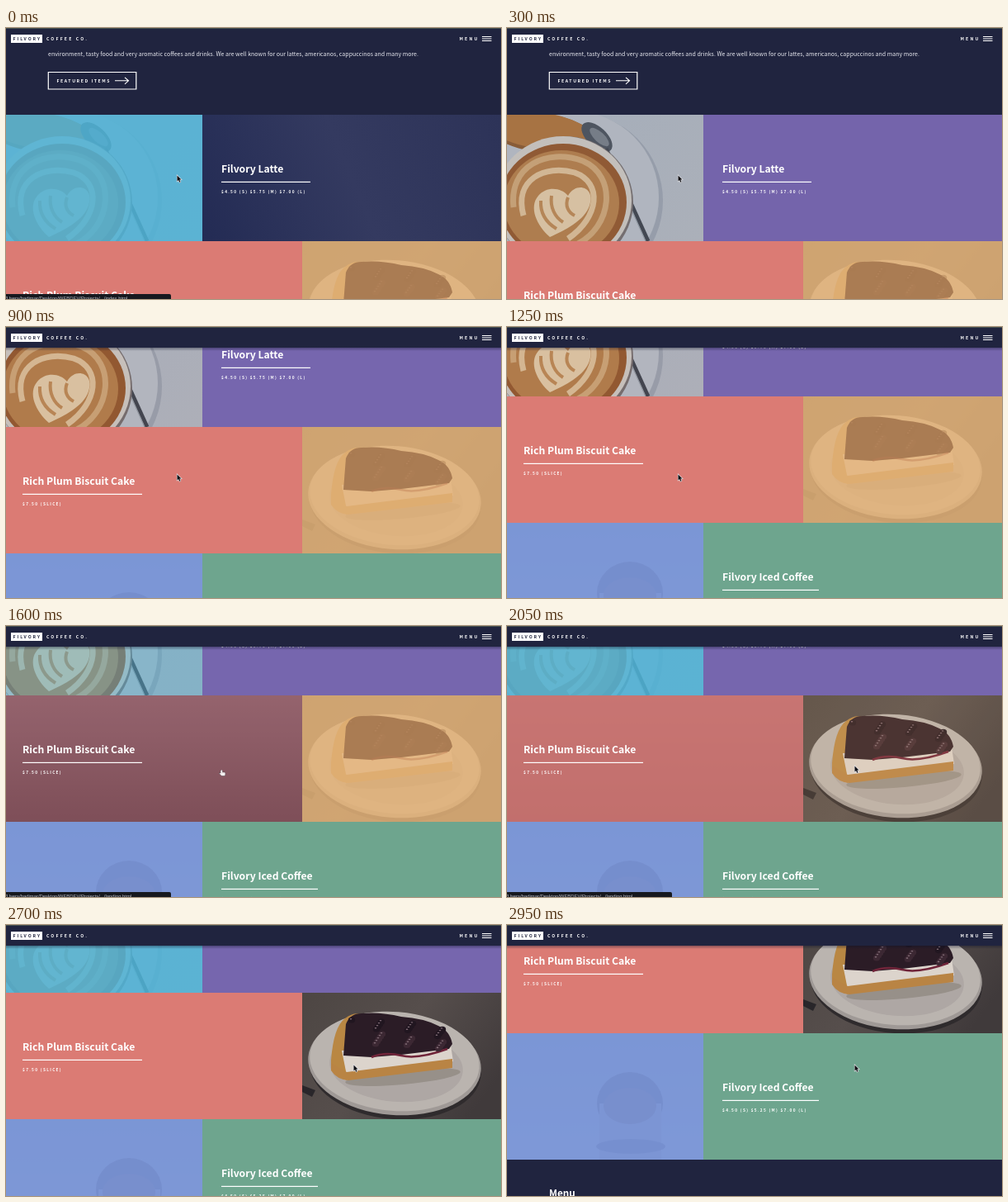
Write an HTML page with a canvas that moves like this. It is 600 by 328 pixels and loops after 3 s.

```html
<!DOCTYPE html>
<html lang="en">
<head>
<meta charset="utf-8">
<title>Coffee shop page</title>
<style>
html, body { margin: 0; width: 100%; height: 100%; overflow: hidden; background: #20243f; }
canvas { display: block; width: 600px; height: 328px; }
</style>
</head>
<body>
<canvas id="stage" width="600" height="328"></canvas>
<script>
const ctx = document.getElementById('stage').getContext('2d');
const SANS = '"Noto Sans CJK JP", "Noto Sans CJK SC", "Noto Sans", sans-serif';
const NAVY = '#20243f';
const ROW = 153;
const LOOP = 3000;

const clamp = v => Math.max(0, Math.min(1, v));
const span = (t, start, length) => clamp((t - start) / length);
const smooth = u => u * u * (3 - 2 * u);
const easeOut = u => 1 - (1 - u) ** 3;
const easeInOut = u => u < .5 ? 4 * u ** 3 : 1 - (2 - 2 * u) ** 3 / 2;

// The CSS "ease" curve, solved by bisection
function ease(u) {
  const bez = (a, b, s) => 3 * a * s * (1 - s) ** 2 + 3 * b * s * s * (1 - s) + s ** 3;
  let lo = 0, hi = 1;
  for (let i = 0; i < 20; i++) {
    const mid = (lo + hi) / 2;
    if (bez(.25, .25, mid) < u) lo = mid; else hi = mid;
  }
  return bez(.1, 1, lo);
}

function text(str, x, y, size, { weight = 700, gap = 0, color = '#fff', family = SANS } = {}) {
  ctx.font = `${weight} ${size}px ${family}`;
  ctx.letterSpacing = gap + 'px';
  ctx.fillStyle = color;
  ctx.fillText(str, x, y);
}

function rect(x, y, w, h, color) {
  ctx.fillStyle = color;
  ctx.fillRect(x, y, w, h);
}

function oval(x, y, rx, ry, color, turn = 0) {
  ctx.fillStyle = color;
  ctx.beginPath();
  ctx.ellipse(x, y, rx, ry, turn, 0, 2 * Math.PI);
  ctx.fill();
}

function shape(path, color) {
  ctx.fillStyle = color;
  ctx.fill(new Path2D(path));
}

function stroke(path, width, color = '#fff') {
  ctx.strokeStyle = color;
  ctx.lineWidth = width;
  ctx.stroke(new Path2D(path));
}

function gradient(x0, y0, x1, y1, ...colors) {
  const g = ctx.createLinearGradient(x0, y0, x1, y1);
  colors.forEach((c, i) => g.addColorStop(i / (colors.length - 1), c));
  return g;
}

function drawLatte() {
  rect(0, 0, 238, ROW, gradient(90, 0, 238, ROW, '#a8adb9', '#adafb8'));
  oval(84, 104, 105, 106, '#989ca8');
  oval(81, 100, 103, 104, '#b2b5be');
  oval(42, 22, 66, 24, '#8a5a34', .14);
  oval(40, 19, 64, 22, '#a9713f', .14);
  oval(109, 27, 23, 12, '#4f535d', .75);
  oval(112, 27, 15, 6, '#777b85', .75);
  stroke('M120 41 L171 153', 5, '#43454f');
  stroke('M118 41 L168 153', 1.3, '#9297a0');
  oval(70, 106, 83, 80, '#756c6d');
  oval(68, 104, 83, 78, '#c6bfba');
  oval(68, 106, 77, 71, '#925831');
  oval(66, 107, 70, 64, '#b07b4b');
  stroke('M8 112 C2 62 48 40 92 56 C134 74 128 136 84 157', 7, '#c79f74');
  stroke('M20 122 C8 78 46 60 82 70 C116 82 112 124 74 150', 7, '#d4b692');
  shape('M74 98 C84 80 108 88 100 110 C94 128 70 140 52 148 C36 134 26 112 38 98 C48 86 66 88 74 98Z', '#d9c0a0');
  stroke('M41 104 C40 122 50 132 60 138 M54 98 C52 112 58 124 68 130 M74 100 C70 110 74 118 82 122', 4, '#b88555');
}

const TOPPING = 'M53 38 Q58 25 72 25 Q96 23 120 29 Q148 31 165 40 Q179 46 182 62 L178 68 L120 75 L84 78 L50 76Z';

function drawCake() {
  rect(0, 0, 241, ROW, gradient(0, 0, 200, ROW, '#4d4643', '#564e4c', '#403a3b'));
  shape('M0 112 L16 118 L12 126 L0 120Z', '#29262a');
  oval(113, 92, 104, 61, '#2f2b2d', .08);
  oval(112, 86, 105, 62, '#9f9996', .08);
  oval(112, 83, 103, 60, '#bab4af', .08);
  oval(114, 89, 81, 43, '#aea7a4', .08);
  oval(122, 102, 70, 9, '#979089', -.09);
  shape('M35 82 Q38 41 52 31 Q62 23 72 26 L55 58 L52 80 L54 106 Q40 100 35 90Z', '#b98743');
  shape('M48 70 L180 63 L183 83 L54 100Z', '#dcd4cc');
  shape('M35 85 L54 96 L182 80 L182 91 L56 106 Q42 105 35 94Z', '#b98444');
  shape(TOPPING, '#2b1c26');
  stroke('M84 78 Q100 71 120 76 T176 68', 2.5, '#702439');
  for (let i = 0; i < 26; i++) {
    const x = 60 + i * 37 % 112;
    const y = 33 + i * 17 % 33 + Math.max(0, x - 110) * .14;
    oval(x, y, 4.2, 3.6, i % 2 ? '#3c2833' : '#211620');
    oval(x - 1, y - 1.3, 1.3, .8, '#87717b');
  }
}

function drawGlass() {
  rect(0, 0, 238, ROW, gradient(0, 0, 0, ROW, '#9da0ad', '#b3b4bd'));
  oval(149, 85, 40, 38, '#70636b');
  rect(112, 85, 75, 68, '#a29aa5');
  oval(149, 88, 32, 22, '#806a6a');
  oval(150, 137, 42, 9, '#77707a');
}

const PRODUCTS = [
  { y: 105, split: 238, textX: 261, rule: 108, title: 'Filvory Latte', price: '$4.50 (S) $5.75 (M) $7.00 (L)',
    panel: '#7666ae', tint: '#4eb4d8', alpha: .86, photo: drawLatte, photoLeft: true },
  { y: 258, split: 359, textX: 20, rule: 145, title: 'Rich Plum Biscuit Cake', price: '$7.50 (SLICE)',
    panel: '#db7b74', tint: '#e6b47a', alpha: .85, photo: drawCake, photoLeft: false },
  { y: 411, split: 238, textX: 261, rule: 117, title: 'Filvory Iced Coffee', price: '$4.50 (S) $5.25 (M) $7.00 (L)',
    panel: '#6ea58e', tint: '#7795dc', alpha: .87, photo: drawGlass, photoLeft: true }
];

// dark: how far the panel has turned navy; clear: how far the photo is revealed
function drawProduct(p, dark, clear) {
  const photoX = p.photoLeft ? 0 : p.split;
  const photoW = p.photoLeft ? p.split : 600 - p.split;
  const panelX = p.photoLeft ? p.split : 0;
  const panelW = 600 - photoW;

  ctx.save();
  ctx.translate(photoX, p.y);
  ctx.beginPath();
  ctx.rect(0, 0, photoW, ROW);
  ctx.clip();
  p.photo();
  ctx.globalAlpha = p.alpha * (1 - clear);
  rect(0, 0, photoW, ROW, p.tint);
  if (p.photo === drawCake) {
    ctx.globalAlpha = .34 * (1 - clear);
    shape(TOPPING, '#6e3c20');
  }
  ctx.restore();

  rect(panelX, p.y, panelW, ROW, p.photoLeft
    ? gradient(panelX, p.y + ROW, panelX + panelW, p.y, '#232b54', '#343a60', '#2d3358')
    : gradient(0, p.y, 0, p.y + ROW, '#4c4b68', '#1d203c'));
  ctx.globalAlpha = 1 - dark;
  rect(panelX, p.y, panelW, ROW, p.panel);
  ctx.globalAlpha = 1;

  text(p.title, p.textX, p.y + 70.4, 12.2);
  rect(p.textX, p.y + 80.8, p.rule, 1.2, '#fff');
  text(p.price, p.textX, p.y + 94.9, 4.8, { gap: 1.3 });
}

function drawIntro() {
  text('environment, tasty food and very aromatic coffees and drinks. We are well known for our lattes, americanos, cappuccinos and many more.',
    51, 34, 7.02, { weight: 400, color: '#e6e7ee' });
  stroke('M51.3 53.5 H157.8 V74 H51.3Z', 1.2);
  text('FEATURED ITEMS', 61.5, 65.8, 5.2, { gap: 1.57 });
  stroke('M132 63.8 H148.5 M144 59.8 L148.5 63.8 L144 67.8', 1.1);
}

function drawHeader(scroll) {
  if (scroll > 80) rect(0, 25, 600, 4, gradient(0, 25, 0, 29, 'rgba(15,18,40,.4)', 'rgba(15,18,40,0)'));
  rect(0, 0, 600, 25, NAVY);
  rect(0, 0, 600, 1, '#46524f');
  rect(6, 8, 38, 10, '#fff');
  text('FILVORY', 8.6, 15, 5.2, { gap: 1.9, color: NAVY });
  text('COFFEE CO.', 49, 15, 5.2, { gap: 2.15 });
  text('MENU', 549.5, 15, 5.2, { gap: 2.2 });
  for (const y of [10, 12.5, 15]) rect(577, y, 11.5, 1, '#fff');
}

function drawStatus(page, alpha) {
  ctx.globalAlpha = alpha;
  ctx.fillStyle = '#17191f';
  ctx.beginPath();
  ctx.roundRect(-4, 322, 204, 10, 2);
  ctx.fill();
  text(`/Users/hadimar/Desktop/WEBDEV/Projects/.../${page}.html`, -1, 329, 5.9,
    { weight: 400, color: '#b9bcc4', family: '"Liberation Sans", Arial, sans-serif' });
  ctx.globalAlpha = 1;
}

function drawCursor(x, y, hand) {
  ctx.save();
  ctx.translate(x, y);
  const path = hand
    ? 'M-2 -1 Q-1 -3 0 -1 L0 1 L3 1 Q4 2 3 5 L-1 5 L-4 2 L-2 2Z'
    : 'M0 0 L0 7 L1.6 5.6 L2.8 8.3 L4 7.8 L2.8 5.1 L5 5Z';
  stroke(path, hand ? .8 : 1.2, hand ? '#49454e' : '#e8e8ec');
  shape(path, hand ? '#f3eeee' : '#0c0c10');
  ctx.restore();
}

function draw(t) {
  const scroll = Math.round(174 * easeOut(span(t, 600, 740)) + 106 * smooth(span(t, 2680, 270)));
  const move = easeInOut(span(t, 1400, 500));
  const firstHover = ease(span(t, 0, 370));
  const leave = ease(span(t, 1400, 700));
  const enterPhoto = ease(span(t, 1690, 700));
  const redDark = ease(span(Math.min(t, 1690), 1400, 700)) * (1 - enterPhoto);

  rect(0, 0, 600, 328, NAVY);
  ctx.save();
  ctx.translate(0, -scroll);
  drawIntro();
  drawProduct(PRODUCTS[0], 1 - firstHover, firstHover * (1 - leave));
  drawProduct(PRODUCTS[1], redDark, enterPhoto);
  drawProduct(PRODUCTS[2], 0, 0);
  text('Menu', 51, 609, 11.7);
  ctx.restore();

  drawHeader(scroll);
  if (t < 200) drawStatus('index', 1 - t / 200);
  drawStatus('landing', span(t, 1400, 150) * (1 - span(t, 2250, 200)));
  drawCursor(207.5 + 214 * move, 178.5 - 9 * move, move > 0 && move < .7);
}

const begin = performance.now();
function tick() {
  const t = (performance.now() - begin) % LOOP;
  draw(Math.floor(t / 50) * 50);
  requestAnimationFrame(tick);
}
tick();
</script>
</body>
</html>
```
